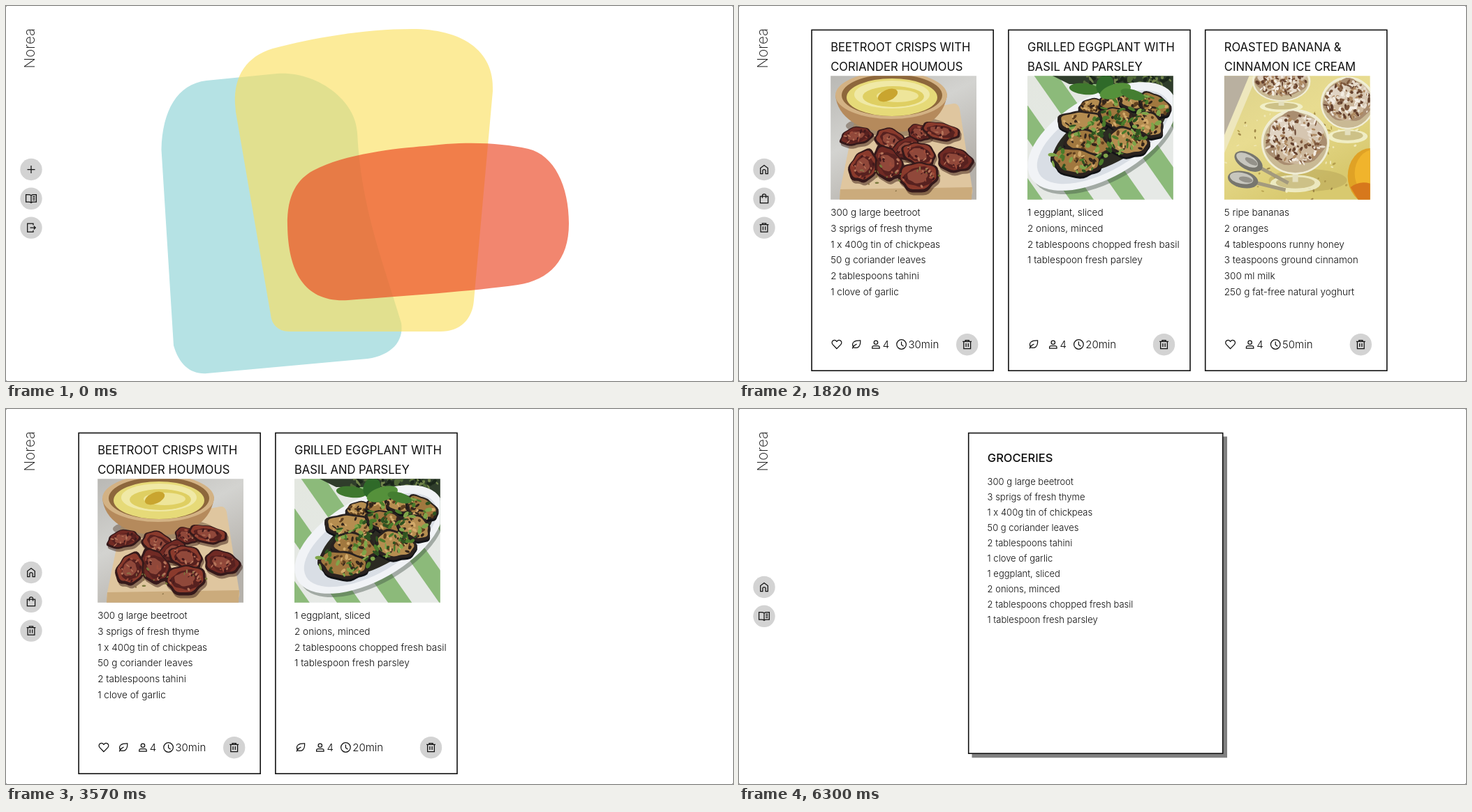
An HTML page with a canvas that plays this animation: 1041 px wide and 538 px high, repeating every 6650 ms.

```html
<!DOCTYPE html>
<html lang="en">
<head>
<meta charset="utf-8">
<title>Recipe book</title>
<style>
  html, body { margin: 0; width: 100%; height: 100%; overflow: hidden; background: #fff; }
  canvas { display: block; }
</style>
</head>
<body>
<canvas id="stage" width="1041" height="538"></canvas>
<script>
const ctx = document.getElementById('stage').getContext('2d');
const LOOP = 6650;
const SCENES = [
  [0, drawHome],
  [910, () => drawBook(3)],
  [3010, () => drawBook(2)],
  [5250, () => drawNav(255.5, ['home', 'book'])],
  [5320, drawGroceries]
];

const ICONS = {
  plus: 'M-5.5 0H5.5M0-5.5V5.5',
  book: 'M0-4.4C-1-5.4-2-5.7-3.5-5.7H-7.4V4.8H-3.5C-2 4.8-1 5-0 6C1 5 2 4.8 3.5 4.8H7.4V-5.7H3.5C2-5.7 1-5.4 0-4.4V5.6M2.3-2.9H5.4M2.3-.6H5.4M2.3 1.7H5.4',
  exit: 'M3-3.6V-6H-5.3V6H3V3.6M-1.5 0H6M3.8-2.4L6.2 0L3.8 2.4',
  home: 'M-5.3 6V-2L0-6L5.3-2V6H2.1V2C2.1-.6-2.1-.6-2.1 2V6Z',
  bag: 'M-5.6-3.2H5.6V6.2H-5.6ZM-2.6-.8V-4C-2.6-7.4 2.6-7.4 2.6-4V-.8',
  trash: 'M-6.4-4.4H6.4M-4.9-4.4V6H4.9V-4.4M-2.6-4.4V-6.2H2.6V-4.4M-1.6-1.8V3.4M1.6-1.8V3.4',
  heart: 'M0 6.2L-5.8.2C-9.4-4.6-3-8.4 0-4.2C3-8.4 9.4-4.6 5.8.2Z',
  leaf: 'M-5.6 6C-4.8 2.8-2.6.8.6-.4M-4 4.4C-8-2.8-2.6-5.8 5.8-5.6C6.2 2.6 2.6 6.4-4 4.4Z',
  person: 'M-2.7-2.8A2.7 2.7 0 1 1 2.7-2.8A2.7 2.7 0 1 1-2.7-2.8ZM-5.2 5.6V4C-5.2 2.6-4 2-2.6 2H2.6C4 2 5.2 2.6 5.2 4V5.6Z',
  clock: 'M-6.8 0A6.8 6.8 0 1 1 6.8 0A6.8 6.8 0 1 1-6.8 0ZM0-4V.4L3 2.8'
};

const RECIPES = [
  {
    title: ['BEETROOT CRISPS WITH', 'CORIANDER HOUMOUS'],
    items: ['300 g large beetroot', '3 sprigs of fresh thyme', '1 x 400g tin of chickpeas',
      '50 g coriander leaves', '2 tablespoons tahini', '1 clove of garlic'],
    tags: ['heart', 'leaf'], time: '30min', photo: beetroot
  },
  {
    title: ['GRILLED EGGPLANT WITH', 'BASIL AND PARSLEY'],
    items: ['1 eggplant, sliced', '2 onions, minced', '2 tablespoons chopped fresh basil',
      '1 tablespoon fresh parsley'],
    tags: ['leaf'], time: '20min', photo: eggplant
  },
  {
    title: ['ROASTED BANANA &', 'CINNAMON ICE CREAM'],
    items: ['5 ripe bananas', '2 oranges', '4 tablespoons runny honey',
      '3 teaspoons ground cinnamon', '300 ml milk', '250 g fat-free natural yoghurt'],
    tags: ['heart'], time: '50min', photo: iceCream
  }
];

function text(str, x, y, size, weight = 300) {
  ctx.font = `${weight} ${size}px Inter, "Open Sans", sans-serif`;
  ctx.fillStyle = '#0c0c0c';
  ctx.fillText(str, x, y);
}

function icon(name, x, y) {
  ctx.save();
  ctx.translate(x, y);
  ctx.strokeStyle = '#111';
  ctx.lineWidth = 1.25;
  ctx.stroke(new Path2D(ICONS[name]));
  ctx.restore();
}

function oval(x, y, rx, ry, fill, rot = 0) {
  ctx.beginPath();
  ctx.ellipse(x, y, rx, ry, rot, 0, 7);
  ctx.fillStyle = fill;
  ctx.fill();
}

// an oval with a rippled edge
function ripple(x, y, rx, ry, fill, rot, phase) {
  ctx.save();
  ctx.translate(x, y);
  ctx.rotate(rot);
  ctx.beginPath();
  for (let a = 0; a < 6.28; a += 0.15) {
    const r = 1 + 0.06 * Math.sin(3 * a + phase) + 0.04 * Math.sin(7 * a + phase * 2);
    ctx.lineTo(Math.cos(a) * rx * r, Math.sin(a) * ry * r);
  }
  ctx.fillStyle = fill;
  ctx.fill();
  ctx.restore();
}

function shape(d, fill) {
  ctx.fillStyle = fill;
  ctx.fill(new Path2D(d));
}

function button(name, x, y) {
  oval(x, y, 15.7, 15.7, '#d3d3d3');
  icon(name, x, y);
}

function random(seed) {
  return () => (seed = seed * 16807 % 2147483647) / 2147483647;
}

// scatters small flecks inside an oval
function flecks(n, x, y, rx, ry, size, colors, seed, rot = 0) {
  const rnd = random(seed * 7919);
  for (let i = 0; i < n; i++) {
    const a = rnd() * 6.283, r = Math.sqrt(rnd());
    const u = Math.cos(a) * r * rx, v = Math.sin(a) * r * ry;
    oval(x + u * Math.cos(rot) - v * Math.sin(rot), y + u * Math.sin(rot) + v * Math.cos(rot),
      size * (0.5 + rnd()), size * (0.3 + rnd() * 0.5), colors[i % colors.length], rnd() * 3);
  }
}

function drawNav(top, names) {
  ctx.save();
  ctx.translate(41, 89.5);
  ctx.rotate(-Math.PI / 2);
  text('Norea', 0, 0, 20.5, 200);
  ctx.restore();
  names.forEach((name, i) => button(name, 36, top + i * 41.8));
}

function drawHome() {
  shape('M222.5 206C224 150 245 112 287 107L388 97C445 93 501 135 503 182C508 290 541 370 566 455C570 481 552 501 518 506L288 527C265 529 248 515 240 487Z', '#b5e2e4');
  shape('M328 140C326 100 345 72 382 61C440 46 510 33 582 33C650 33 700 62 697 122L670 422C668 450 650 467 622 467H406C388 467 380 455 379 443L329 152Z', 'rgba(250,224,96,.64)');
  shape('M403 315C402 270 418 248 440 236C485 212 560 204 600 201L630 198C680 195 715 198 748 205C785 214 806 258 806 312C806 365 778 393 733 400C670 409 570 416 490 422C430 426 404 385 403 315Z', 'rgba(235,66,30,.64)');
  drawNav(234.5, ['plus', 'book', 'exit']);
}

function drawBook(count) {
  RECIPES.slice(0, count).forEach((r, i) => drawCard(r, 104 + i * 281.8));
  drawNav(234.5, ['home', 'bag', 'trash']);
}

function drawCard(r, x) {
  frame(x + 0.1, 34.4, 260.1, 488.8);
  r.title.forEach((t, i) => text(t, x + 27.2, 65.2 + i * 27.7, 16.6, 400));
  ctx.save();
  ctx.beginPath();
  ctx.rect(x + 27.2, 100.3, 208.8, 177.5);
  ctx.clip();
  ctx.translate(x + 27, 100);
  r.photo();
  ctx.restore();
  r.items.forEach((t, i) => text(t, x + 27.2, 300.8 + i * 22.85, 13.55));
  let at = x + 36;
  for (const tag of r.tags) {
    icon(tag, at, 485.5);
    at += 28;
  }
  icon('person', at, 485.5);
  text('4', at + 9.7, 491.3, 15);
  icon('clock', at + 36.6, 485.5);
  text(r.time, at + 46.5, 491.3, 15);
  button('trash', x + 222.7, 485.7);
}

function frame(x, y, w, h) {
  ctx.fillStyle = '#fff';
  ctx.fillRect(x, y, w, h);
  ctx.strokeStyle = '#111';
  ctx.lineWidth = 1.6;
  ctx.strokeRect(x, y, w, h);
}

function drawGroceries() {
  ctx.fillStyle = '#808080';
  ctx.fillRect(333.5, 39.5, 365.5, 460.8);
  frame(328.7, 34.5, 364, 459.7);
  text('GROCERIES', 355.8, 76, 16.5, 500);
  [...RECIPES[0].items, ...RECIPES[1].items]
    .forEach((t, i) => text(t, 355.6, 109.4 + i * 21.95, 13));
  drawNav(255.5, ['home', 'book']);
}

function fillPhoto(...colors) {
  const g = ctx.createLinearGradient(0, 0, 90, 178);
  colors.forEach((c, i) => g.addColorStop(i / (colors.length - 1), c));
  ctx.fillStyle = g;
  ctx.fillRect(0, 0, 210, 178);
}

function beetroot() {
  fillPhoto('#b9b8b4', '#d3d3d0', '#b5b1ab');
  shape('M34 66L176 40Q183 39 185 48L203 162Q205 173 196 174L24 176Q11 176 14 163Z', '#dfc69f');
  shape('M14 163L203 160L202 178H13Z', '#cbab7c');
  oval(94, 72, 72, 15, 'rgba(70,45,25,.4)');
  shape('M7 28C10 60 42 81 88 81C136 81 164 58 167 26Z', '#b58a5c');
  oval(87, 28, 80, 34, '#d3b284');
  oval(88, 28, 72, 30, '#8d673c');
  oval(88, 31, 65, 27, '#e6da78');
  oval(88, 27, 54, 20, '#f0e9a6');
  oval(90, 30, 44, 15, '#dfcf62');
  oval(96, 29, 30, 9, '#eee59a');
  oval(82, 28, 15, 8, '#c9a52f', -0.4);
  const crisps = [[37, 87, 24, 13, -0.2], [87, 93, 25, 16, 0.4], [128, 82, 18, 12, 0.2], [158, 80, 28, 13, 0.2],
    [107, 105, 22, 15, -0.5], [127, 113, 25, 17, 0.3], [82, 126, 20, 27, -0.5], [47, 130, 19, 25, 0.5],
    [178, 121, 26, 18, 0.2], [126, 145, 29, 22, -0.1]];
  crisps.forEach(([x, y, rx, ry, rot], i) => {
    ripple(x + 2, y + 4, rx, ry, 'rgba(60,30,20,.5)', rot, i);
    ripple(x, y, rx, ry, '#35191a', rot, i);
    ripple(x, y - 1, rx * 0.88, ry * 0.84, i % 2 ? '#8a3a2c' : '#702a24', rot, i);
    ripple(x + 1, y, rx * 0.72, ry * 0.64, '#57211f', rot, i + 2);
    ripple(x - 1, y - 1, rx * 0.5, ry * 0.45, '#90483a', rot, i + 1);
    flecks(16, x, y, rx * 0.8, ry * 0.7, 2.2, ['#b5745a', '#41191b', '#9c4b3a'], i + 31, rot);
  });
  flecks(20, 115, 145, 80, 22, 2, ['#76773b', '#8b7448'], 8);
}

function eggplant() {
  fillPhoto('#e3e7e0', '#e6e9e6');
  ctx.save();
  ctx.rotate(0.96);
  ctx.fillStyle = '#8cba7a';
  for (let y = -216; y < 150; y += 60) ctx.fillRect(-20, y, 320, 28);
  ctx.restore();
  shape('M36 0H210V32L160 12L60 12Z', '#2f3d2b');
  flecks(60, 140, 5, 75, 11, 4, ['#526b38', '#1b271a', '#71844b'], 17);
  oval(111, 94, 116, 57, 'rgba(60,75,65,.4)', -0.52);
  oval(107, 87, 118, 59, '#f1f3f6', -0.52);
  oval(109, 88, 106, 48, '#d9dee5', -0.52);
  oval(118, 84, 92, 40, '#2b2a22', -0.52);
  const slices = [[96, 46, 22, 13, 0.1], [125, 40, 24, 13, 0.1], [154, 36, 26, 14, 0.2], [182, 42, 25, 16, 0.5],
    [80, 69, 36, 19, 0.1], [130, 62, 28, 16, 0.3], [172, 70, 25, 18, 0.4], [86, 97, 34, 19, 0.2],
    [144, 95, 30, 21, 0.2], [70, 123, 37, 20, 0.15]];
  slices.forEach(([x, y, rx, ry, rot], i) => {
    ripple(x, y + 3, rx, ry, '#121316', rot, i);
    ripple(x, y, rx, ry, '#2a221f', rot, i);
    ripple(x, y - 1, rx * 0.86, ry * 0.8, i % 2 ? '#a1783f' : '#b58d50', rot, i);
    flecks(24, x, y, rx * 0.82, ry * 0.72, 3, ['#60401f', '#d3aa6b', '#33251b'], i + 71, rot);
  });
  flecks(130, 116, 82, 96, 40, 3.8, ['#4b7b2b', '#7fa54a', '#2f5320'], 93, -0.52);
  oval(82, 19, 22, 8, '#3f782e', 0.1);
  oval(111, 13, 12, 15, '#2f6a29', 0.4);
  oval(126, 22, 23, 10, '#55913b', -0.3);
  oval(151, 27, 18, 7, '#447e31', 0.3);
}

function glass(x, y, rx, ry, seed) {
  oval(x, y + ry * 1.3, rx * 0.75, ry * 0.27, 'rgba(246,245,214,.8)');
  oval(x, y + ry * 1.27, rx * 0.58, ry * 0.18, '#cdc187');
  ctx.fillStyle = '#e4dfbd';
  ctx.fillRect(x - 4, y + ry * 0.75, 8, ry * 0.5);
  oval(x, y, rx, ry, '#efecd2');
  oval(x, y + 1, rx * 0.95, ry * 0.94, '#c9b994');
  ripple(x, y - ry * 0.08, rx * 0.88, ry * 0.82, '#a98d70', 0, seed);
  ripple(x - rx * 0.3, y - ry * 0.25, rx * 0.5, ry * 0.5, '#e0d3c3', 0, seed);
  ripple(x + rx * 0.33, y - ry * 0.3, rx * 0.49, ry * 0.48, '#d6c6b1', 0, seed + 1);
  ripple(x, y + ry * 0.25, rx * 0.58, ry * 0.42, '#cdb89d', 0, seed + 2);
  flecks(150, x, y - ry * 0.06, rx * 0.86, ry * 0.78, 3, ['#7d573c', '#f3ece2', '#ae8a63', '#e7dccd', '#64412e'], seed);
  ctx.beginPath();
  ctx.ellipse(x, y, rx, ry, 0, 0, 7);
  ctx.strokeStyle = '#f1eed8';
  ctx.lineWidth = 1.6;
  ctx.stroke();
}

function spoon(x, y, rot, tipX, tipY) {
  ctx.beginPath();
  ctx.moveTo(x, y);
  ctx.lineTo(tipX, tipY);
  ctx.strokeStyle = '#a39a7e';
  ctx.lineWidth = 5;
  ctx.stroke();
  oval(x, y, 22, 12, '#77766e', rot);
  oval(x - 2, y - 2, 17, 8, '#c7c6be', rot);
  oval(x + 4, y, 10, 4, '#94928a', rot);
}

function iceCream() {
  fillPhoto('#ddd28a', '#e8dc90', '#d8c96f');
  shape('M0 0H40L0 88Z', '#b9b0a0');
  shape('M36 0H47L0 112V86Z', '#eee7bd');
  flecks(80, 104, 115, 104, 68, 2, ['#b6a14f', '#9f8848', '#f0e8b4'], 45);
  glass(82, 8, 41, 28, 12);
  glass(177, 39, 38, 37, 25);
  oval(120, 150, 56, 16, 'rgba(135,116,55,.22)');
  glass(102, 95, 48, 46, 57);
  spoon(35, 123, 0.5, 92, 154);
  spoon(27, 149, 0.2, 88, 164);
  oval(210, 144, 33, 40, '#e0a225');
  oval(215, 140, 28, 34, '#f0b42c');
  shape('M181 160Q194 150 210 155V178H192Z', '#d7781c');
}

function render(draw) {
  ctx.fillStyle = '#fff';
  ctx.fillRect(0, 0, 1041, 538);
  draw();
  ctx.fillStyle = '#8a8a8a';
  for (const x of [0, 1040]) for (const y of [0, 537]) ctx.fillRect(x, y, 1, 1);
}

let shown;
function tick() {
  const t = performance.now() % LOOP;
  const [, draw] = SCENES.findLast(([start]) => t >= start);
  if (draw !== shown) render(shown = draw);
  requestAnimationFrame(tick);
}
tick();
</script>
</body>
</html>
```
